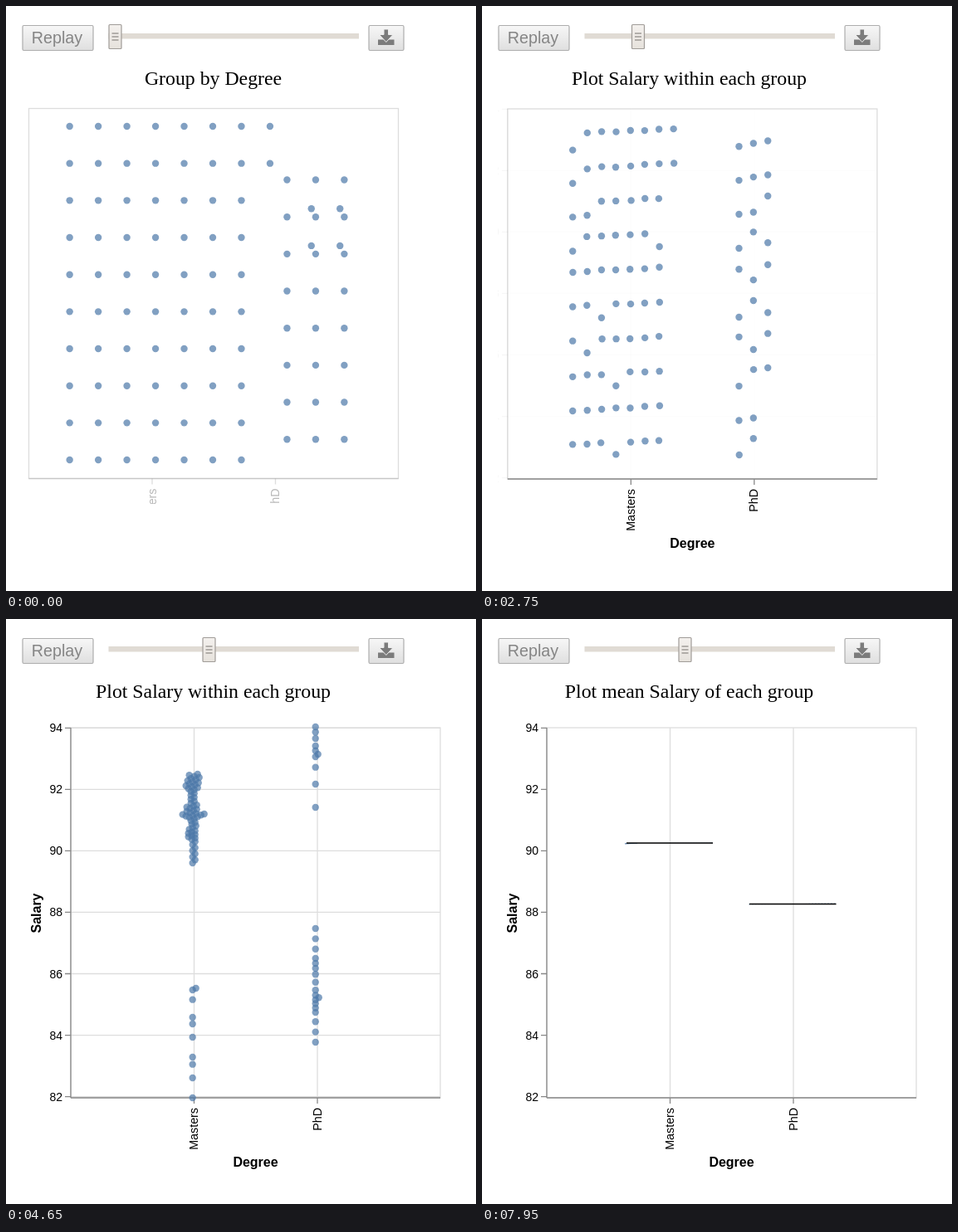
Write an HTML page with a canvas that moves like this. It is 566x705 px and loops after 8 s.

```html
<!DOCTYPE html>
<html>
<head>
<meta charset="utf-8">
<style>
html, body { margin: 0; width: 100%; height: 100%; overflow: hidden; background: #fff; }
canvas { display: block; }
</style>
</head>
<body>
<canvas id="stage" width="566" height="705"></canvas>
<script>
const ctx = document.getElementById('stage').getContext('2d');
const LOOP = 8000, STEP = 50, BLUE = '#4c78a8';
const SANS = '"Liberation Sans", Arial, sans-serif';
const SERIF = '"Liberation Serif", "Times New Roman", serif';

// Each group holds a low and a high salary cluster; "low" and "high" are
// evenly spaced heights along the sorted cluster, "rare" the smaller cluster.
const groups = [
  {
    name: 'Masters', size: 72, tick: 148.5, gridX: 101, swarmX: 224.7, lineX: 173, gap: 1.464,
    mean: 270, rule: [174, 278],
    rare: [0, 1, 2, 3, 12, 16, 25, 37, 39, 63], rareIsLow: true,
    low: [577, 541, 528, 492, 480, 448, 445],
    high: [294, 266, 255, 239, 234, 224, 206, 197, 187]
  },
  {
    name: 'PhD', size: 28, tick: 297, gridX: 305, swarmX: 372.7, lineX: 322, gap: 3.8,
    mean: 343.5, rule: [322, 426.5],
    rare: [4, 6, 13, 15, 17, 19, 22, 24, 26, 27], rareIsLow: false,
    low: [510, 475, 460, 452, 425, 408, 373],
    high: [227, 185, 166, 161.5, 153, 139.5, 130]
  }
];

const mix = (a, b, p) => a + (b - a) * p;
const rowY = i => 145 + (i % 10) * 44.67;
const column = i => Math.floor(i / 10);

let seed = 7;
const random = () => (seed = seed * 16807 % 2147483647) / 2147483647;

function ease(t, start, duration) {
  const u = Math.min(1, Math.max(0, (t - start) / duration));
  return u < 0.5 ? 4 * u ** 3 : 1 - 4 * (1 - u) ** 3;
}

function along(heights, u) {
  const i = Math.min(heights.length - 2, Math.floor(u * (heights.length - 1)));
  return mix(heights[i], heights[i + 1], u * (heights.length - 1) - i);
}

// Salary rises with the index inside a cluster, more loosely in a large one.
function rankCluster(members, heights) {
  const last = members.length - 1, scatter = members.length ** 2 / 200;
  return members
    .map((i, k) => ({ i, key: k + (random() - 0.5) * scatter }))
    .sort((a, b) => a.key - b.key)
    .map(({ i }, rank) => ({ i, y: along(heights, rank / last) }));
}

// Nearest free sideways offset that keeps dots apart.
function swarmOffset(y, placed) {
  for (let k = 0; ; k++) {
    const dx = Math.ceil(k / 2) * (k % 2 ? 1 : -1);
    if (placed.every(q => Math.hypot(q.dx - dx, q.y - y) >= 4.2)) return dx;
  }
}

const dots = [];
for (const group of groups) {
  const members = Array.from({ length: group.size }, (_, i) => i);
  const isLow = i => group.rare.includes(i) === group.rareIsLow;
  const ranked = [
    ...rankCluster(members.filter(isLow), group.low),
    ...rankCluster(members.filter(i => !isLow(i)), group.high)
  ];
  const first = dots.length, placed = [];
  ranked.forEach(({ i, y }, rank) => {
    const n = first + i, dx = swarmOffset(y, placed);
    placed.push({ dx, y });
    dots[n] = {
      mean: group.mean, y,
      x0: 67.3 + column(n) * 40.57, y0: rowY(n),
      x1: group.gridX + column(i) * 18.6, y1: rowY(i),
      x2: group.swarmX + dx,
      x3: group.lineX + rank * group.gap
    };
  });
}

function line(x1, y1, x2, y2, color, alpha = 1, width = 1.3) {
  ctx.globalAlpha = alpha;
  ctx.strokeStyle = color;
  ctx.lineWidth = width;
  ctx.beginPath();
  ctx.moveTo(x1, y1);
  ctx.lineTo(x2, y2);
  ctx.stroke();
}

function text(str, x, y, font, { color = '#000', align = 'center', alpha = 1, turn = 0 } = {}) {
  ctx.save();
  ctx.globalAlpha = alpha;
  ctx.fillStyle = color;
  ctx.font = font;
  ctx.textAlign = align;
  ctx.translate(x, y);
  ctx.rotate(turn);
  ctx.fillText(str, 0, 0);
  ctx.restore();
}

function box(x, y, w, h, radius, top, bottom, border) {
  const fill = ctx.createLinearGradient(0, y, 0, y + h);
  fill.addColorStop(0, top);
  fill.addColorStop(1, bottom);
  ctx.fillStyle = fill;
  ctx.strokeStyle = border;
  ctx.lineWidth = 1.2;
  ctx.beginPath();
  ctx.roundRect(x, y, w, h, radius);
  ctx.fill();
  ctx.stroke();
}

function drawControls(t) {
  ctx.globalAlpha = 1;
  box(20, 23.5, 85, 30, 1.5, '#f7f7f7', '#dfdfdf', '#adadad');
  text('Replay', 61.5, 45, '19.7px ' + SANS, { color: '#858585' });

  ctx.fillStyle = '#e0dbd4';
  ctx.fillRect(123.5, 33, 301.5, 6.5);
  const x = t < 1250 ? 131.5 : t < 4650 ? 188 : 244.5;
  box(x - 7.5, 22.5, 15, 29, 1, '#f4f1ee', '#e6e2dc', '#a09c98');
  for (const y of [33, 37, 41]) line(x - 4, y, x + 4, y, '#77736f', 1, 1);

  box(437, 23.5, 42, 30, 1.5, '#f7f7f7', '#dfdfdf', '#adadad');
  ctx.fillStyle = '#7c7c7c';
  ctx.fillRect(448, 40.5, 19.5, 6.5);
  ctx.beginPath();
  [[455, 28], [460.5, 28], [460.5, 34.5], [466, 34.5], [457.8, 43.5], [449.5, 34.5], [455, 34.5]]
    .forEach(p => ctx.lineTo(...p));
  ctx.closePath();
  ctx.fill();
  ctx.strokeStyle = '#eee';
  ctx.lineWidth = 1;
  ctx.stroke();
}

function drawAxes(shown, plotted, gridAlpha) {
  const left = mix(27.5, 78, plotted), top = mix(123.5, 131, plotted);
  const right = left + 445, bottom = top + 446;
  const turn = -Math.PI / 2, label = '14px ' + SANS, title = 'bold 16px ' + SANS;

  ctx.globalAlpha = 1;
  ctx.strokeStyle = '#ddd';
  ctx.lineWidth = 1.3;
  ctx.strokeRect(left, top, 445, 446);

  for (const { name, tick } of groups) {
    const x = left + tick;
    line(x, top, x, bottom, '#ddd', plotted);
    line(x, bottom, x, bottom + 7, '#888', shown);
    text(name, x + 4.5, bottom + 12, '14.3px ' + SANS, { align: 'right', alpha: shown, turn });
  }
  for (let i = 0; i < 7; i++) {
    const y = top + 0.3 + i * 74.05;
    line(left, y, right, y, '#ddd', gridAlpha);
    line(left - 7, y, left, y, '#888', plotted);
    text(94 - 2 * i, left - 10, y + 5, label, { align: 'right', alpha: plotted });
  }
  line(left, bottom, right, bottom, '#888', shown);
  line(left, top, left, bottom, '#888', plotted);
  text('Degree', left + 222.5, bottom + 83, title, { alpha: shown });
  text('Salary', left - 36, top + 223.5, title, { alpha: plotted, turn });
}

function draw(t) {
  const grouped = ease(t, -822, 2000);
  const plotted = ease(t, 2240, 2000);
  // The mean is shown in five equal stages.
  const [sorted, ruled, faded, barred, pulled] = [0, 1, 2, 3, 4].map(i => ease(t, 4695 + i * 665, 665));

  ctx.globalAlpha = 1;
  ctx.fillStyle = '#fff';
  ctx.fillRect(0, 0, 566, 705);
  drawControls(t);
  const heading = t < 2350 ? 'Group by Degree'
    : t < 4750 ? 'Plot Salary within each group' : 'Plot mean Salary of each group';
  text(heading, 249.5, 95, '23.8px ' + SERIF);

  ctx.save();
  ctx.beginPath();
  ctx.rect(19.5, 110, 520, mix(577, 660, grouped) + 10 * plotted - 110);
  ctx.clip();
  drawAxes(grouped, plotted, plotted * (1 - sorted));

  ctx.fillStyle = BLUE;
  for (const d of dots) {
    ctx.globalAlpha = 0.7 * (1 - faded);
    ctx.beginPath();
    ctx.arc(
      mix(mix(mix(d.x0, d.x1, grouped), d.x2, plotted), d.x3, sorted),
      mix(mix(d.y0, d.y1, grouped), d.y, plotted), 4.2, 0, 7);
    ctx.fill();
    ctx.globalAlpha = 0.7 * barred;
    ctx.fillRect(d.x3 - 1, d.mean, 2, (d.y - d.mean) * (1 - pulled));
  }
  for (const { mean, rule } of groups) line(rule[0], mean, rule[1], mean, '#000', ruled, 1.5);
  ctx.restore();
}

function frame() {
  const t = performance.now() % LOOP;
  draw(Math.floor(t / STEP) * STEP);
  requestAnimationFrame(frame);
}
frame();
</script>
</body>
</html>
```
